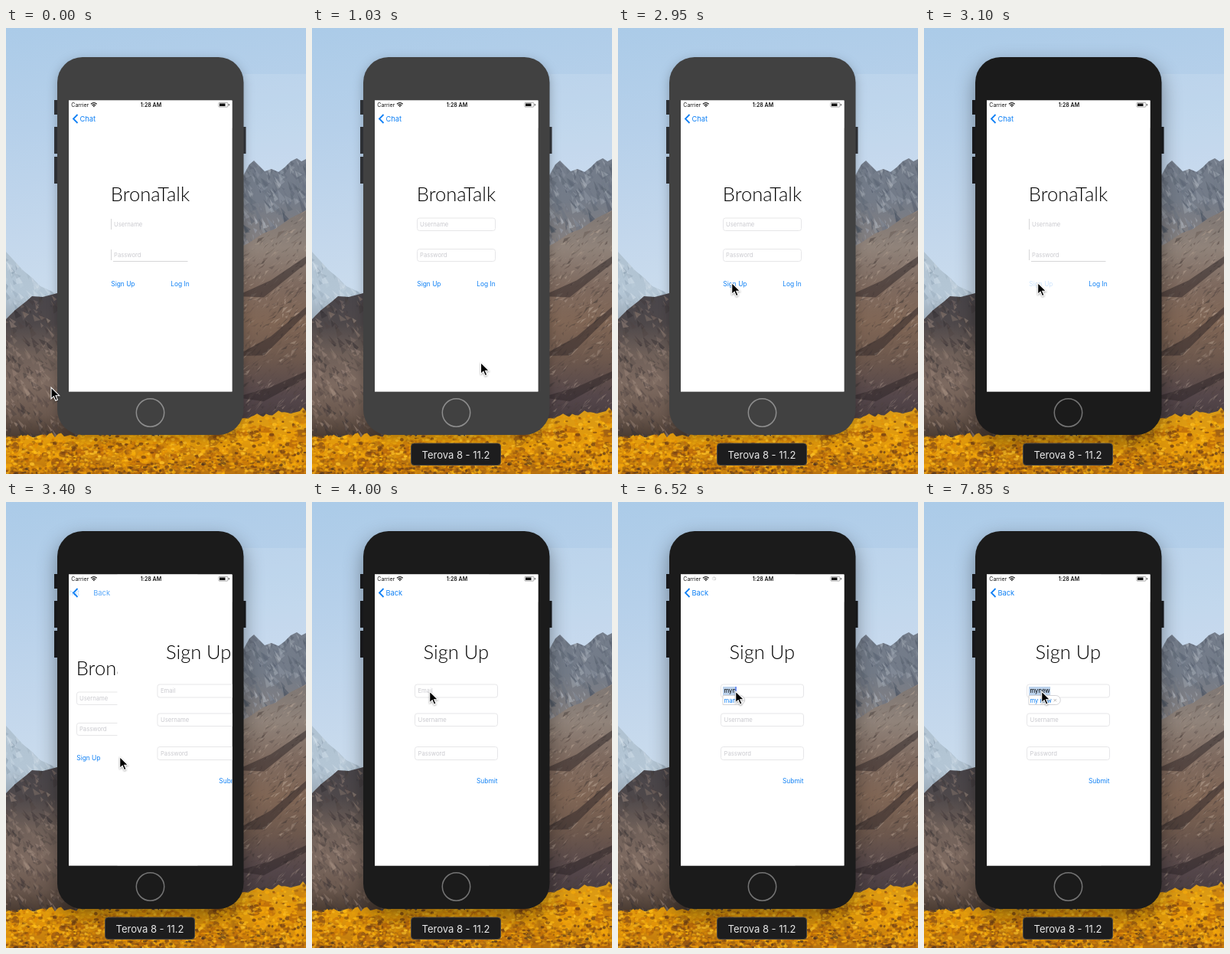
These frames come from a looping animation (392 px wide and 582 px high, 8000 ms). An HTML page with a canvas:

```html
<!DOCTYPE html>
<html lang="en">
<head>
<meta charset="utf-8">
<title>Chat sign up</title>
<style>
  html, body { margin: 0; width: 100%; height: 100%; overflow: hidden; background: #bdd4e9; }
  canvas, svg { position: absolute; left: 0; top: 0; width: 392px; height: 582px; }
  text { font-family: Inter, "Liberation Sans", sans-serif; white-space: pre; }
  #body { fill: #414141; filter: drop-shadow(0 4px 7px rgba(0, 0, 0, .25)); }
  .focused #body { fill: #1b1b1b; filter: drop-shadow(0 10px 13px rgba(0, 0, 0, .4)); }
  .keys { fill: #33363b; }
  .focused .keys { fill: #1d1e21; }
  .home { fill: none; stroke: #8d8d8d; stroke-width: 1.5; }
  .focused .home { stroke: #747474; }
  .status { font-size: 7px; fill: #111; }
  .title { font: 300 25.5px Lato, sans-serif; text-anchor: middle; }
  .nav { font-size: 9.3px; }
  .link { font-size: 8.4px; }
  .nav, .link, #hint { fill: #0f80f5; }
  .end { text-anchor: end; }
  .hold, #typed, #hint { font-size: 7.7px; }
  .hold { fill: #cacacf; }
  .box { fill: #fff; stroke: #e4e4e6; stroke-width: .9; }
  .edge { fill: none; stroke: #d6d6d8; display: none; }
  .faint .box { stroke: none; }
  .faint .edge { display: block; }
</style>
</head>
<body>
<canvas id="scene" width="392" height="582"></canvas>
<svg id="stage" viewBox="0 0 392 582">
  <defs><clipPath id="screen"><rect x="82" y="94.5" width="213.5" height="380"/></clipPath></defs>

  <path class="keys" d="M63 94h5v19h-5zM63 129h5v35h-5zM63 168h5v35h-5zM309 129h4.5v35H309z"/>
  <rect id="body" x="67" y="38" width="243.5" height="493" rx="33"/>
  <circle class="home" cx="188.5" cy="502" r="18.2"/>
  <rect x="82" y="94.5" width="213.5" height="380" fill="#fff"/>

  <g clip-path="url(#screen)">
    <g id="login">
      <rect x="82" y="94.5" width="213.5" height="380" fill="#fff"/>
      <text class="title" x="188.5" y="226">BronaTalk</text>
      <rect class="box" x="137.5" y="248" width="102" height="16.5" rx="3"/>
      <rect class="box" x="137.5" y="288.5" width="102" height="16" rx="3"/>
      <path class="edge" d="M137.5 249v14M137.5 289v14M140 304.5h97.5"/>
      <text class="hold" x="141" y="259">Username</text>
      <text class="hold" x="141" y="298.7">Password</text>
      <text class="link" id="signUp" x="137.3" y="337">Sign Up</text>
      <text class="link end" x="239.7" y="337">Log In</text>
    </g>
    <g id="register">
      <rect x="82" y="94.5" width="213.5" height="380" fill="#fff"/>
      <text class="title" x="188.3" y="205">Sign Up</text>
      <rect class="box" x="134.5" y="238" width="108" height="17" rx="3"/>
      <rect class="box" x="134.5" y="276" width="108" height="16.5" rx="3"/>
      <rect class="box" x="134.5" y="319.5" width="108" height="17" rx="3"/>
      <text class="hold" id="email" x="138.5" y="249.2">Email</text>
      <text class="hold" x="138.5" y="287">Username</text>
      <text class="hold" x="138.5" y="330.7">Password</text>
      <text class="link end" x="242.5" y="367">Submit</text>
      <rect id="mark" x="137" y="241" height="11" fill="#bdd3ec"/>
      <text id="typed" x="138.5" y="249.2"></text>
      <g id="bubble">
        <path id="bubbleBox" fill="#fff" stroke="#cfcfd2" stroke-width=".9"/>
        <text id="hint" x="138.5" y="261.5"></text>
        <path id="cross" d="M-1.7 -1.7l3.4 3.4m0 -3.4l-3.4 3.4" stroke="#aaa" stroke-width=".8"/>
      </g>
      <rect id="caret" y="241" width="1.3" height="11" fill="#426bf2"/>
    </g>
    <rect x="82" y="94.5" width="213.5" height="36" fill="#fff"/>
    <path d="M93.5 113l-5.5 5.5 5.5 5.5" fill="none" stroke="#0f80f5" stroke-width="1.8"/>
    <text class="nav" id="navChat" x="96.5" y="122">Chat</text>
    <text class="nav" id="navBack" x="96.5" y="122">Back</text>
  </g>

  <text class="status" x="85.3" y="102.7">Carrier</text>
  <g fill="none" stroke="#111" stroke-width="1.3">
    <path d="M111 99.3q3.8 -3.2 7.6 0M112.5 101q2.3 -1.9 4.6 0"/>
    <path d="M113.9 102.3h1.8"/>
  </g>
  <g id="spinner" transform="translate(125.5 100)" stroke="#777" stroke-width=".7"></g>
  <text class="status" x="189.5" y="102.7" text-anchor="middle" font-weight="600">1:28 AM</text>
  <rect x="277.9" y="97.4" width="12" height="5.7" rx="1" fill="none" stroke="#888" stroke-width=".7"/>
  <path d="M279 98.4h7.5v3.7H279zM290.8 99.2h.9v2h-.9z" fill="#111"/>

  <g id="label">
    <rect x="129.5" y="542" width="117" height="28.5" rx="4" fill="#1d1d1e" stroke="#4c4640"/>
    <text x="188" y="561.5" text-anchor="middle" font-size="13" fill="#e9e9e9">Terova 8 - 11.2</text>
  </g>
  <path id="pointer" d="M0 0V14.8L3.4 11.7 5.8 17.2 8.3 16.1 6 10.7H10.7Z" stroke="#fff" stroke-width="1.1"
        style="filter: drop-shadow(0 1px 1px rgba(0,0,0,.35))"/>
</svg>
<script>
const $ = id => document.getElementById(id);
const LOOP = 8000, STEP = 4000 / 27;

// Landscape
let seed = 11;
const rand = (a = 0, b = 1) => {
  seed = (seed * 16807) % 2147483647;
  return a + (b - a) * seed / 2147483647;
};
const pick = list => list[Math.floor(rand(0, list.length))];
const ctx = $('scene').getContext('2d');

function gradient(x, top, bottom, colors) {
  const g = ctx.createLinearGradient(0, top, x, bottom);
  colors.forEach((c, i) => g.addColorStop(i / (colors.length - 1), c));
  return g;
}

// A filled ridge with small rock facets that follow its slope.
function ridge(points, base, colors, tints, slope, count) {
  const [left, right] = [points[0][0], points.at(-1)[0]];
  const top = Math.min(...points.map(p => p[1]));
  ctx.save();
  ctx.beginPath();
  ctx.moveTo(left, base);
  points.forEach(p => ctx.lineTo(...p));
  ctx.lineTo(right, base);
  ctx.fillStyle = gradient(0, top, base, colors);
  ctx.fill();
  ctx.clip();
  for (let i = 0; i < count; i++) {
    const x = rand(left - 10, right), y = rand(top, base);
    const len = rand(2, 11), fall = len * slope * rand(.4, 1.6);
    ctx.fillStyle = pick(tints);
    ctx.globalAlpha = rand(.12, .5);
    ctx.beginPath();
    ctx.moveTo(x, y);
    ctx.lineTo(x + len, y + fall);
    ctx.lineTo(x + len * rand(.2, .8), y + fall + rand(1, 6));
    ctx.fill();
  }
  ctx.restore();
}

function blobs(count, edge, size, colors) {
  for (let i = 0; i < count; i++) {
    const x = rand(0, 392), y = rand(edge(x), 582);
    ctx.globalAlpha = rand(.25, .8);
    ctx.fillStyle = pick(colors);
    ctx.beginPath();
    ctx.ellipse(x, y, rand(.4, 1) * size, rand(.3, .7) * size, 0, 0, 7);
    ctx.fill();
  }
  ctx.globalAlpha = 1;
}

function foliage() {
  const edge = x => x < 190 ? 533 - x * .02 : 530 - (x - 190) * .165;
  ctx.beginPath();
  ctx.moveTo(0, 582);
  for (let x = 0; x <= 392; x += 4) ctx.lineTo(x, edge(x) + rand(-4, 4));
  ctx.lineTo(392, 582);
  ctx.fillStyle = gradient(0, 500, 582, ['#d99a16', '#e29a0c', '#b8720f']);
  ctx.fill();
  blobs(170, x => edge(x) + 12, 11, ['#b5650c', '#f0a40c', '#8c4f14', '#e69608']);
  blobs(1500, edge, 3.2, ['#fdbb14', '#f6ab0a', '#ffc52a', '#e28e06', '#c26f0a', '#6f3d14']);
  blobs(420, x => edge(x) + 42, 3, ['#4f3320', '#7d4714', '#9c5a10', '#e29210']);
}

function landscape() {
  ctx.fillStyle = gradient(60, 0, 400, ['#abcbe8', '#b6d0ea', '#c3d7ec', '#cfdfee']);
  ctx.fillRect(0, 0, 392, 582);
  ctx.fillStyle = 'rgba(255,255,255,.1)';
  ctx.fillRect(311, 60, 81, 130);
  ridge([[0, 292], [10, 303], [22, 316], [34, 326], [45, 337], [67, 347], [80, 352]], 400,
    ['#b0c2d1', '#b4c6d5', '#8f9ba7'], ['#dfe9f2', '#8597a8', '#d3e0ea'], 1, 150);
  ridge([[300, 196], [311, 191], [318, 178], [324, 173], [331, 180], [338, 187], [347, 184],
         [356, 188], [364, 182], [372, 174], [380, 170], [386, 174], [392, 171]], 330,
    ['#747d8b', '#737b88', '#837f80', '#887c76'],
    ['#424c5c', '#a0a9b5', '#b4bac2', '#545d6b', '#646e7e'], 1.1, 420);
  ridge([[0, 380], [12, 368], [26, 357], [34, 350], [48, 351], [67, 346], [200, 352]], 545,
    ['#49454a', '#4e484a', '#6f6059', '#7d6a60', '#6a584e', '#3c2f26'],
    ['#302c2f', '#9c8679', '#4e4341', '#ac9689', '#3d3536'], .8, 900);
  ridge([[300, 290], [318, 280], [336, 268], [352, 262], [372, 248], [392, 238]], 530,
    ['#7d7673', '#90837a', '#7e6a5f', '#806655', '#6d584d', '#54464a', '#41373a'],
    ['#35302f', '#ad998b', '#54453f', '#bdaa9a', '#463c3b'], -.8, 900);
  ctx.fillStyle = 'rgba(44,36,38,.5)';
  for (const [x, y, w, h] of [[300, 350, 92, -52], [300, 428, 92, -64], [300, 482, 92, -34]]) {
    ctx.beginPath();
    ctx.moveTo(x, y);
    ctx.lineTo(x + w * .5, y + h * .4);
    ctx.lineTo(x + w, y + h);
    ctx.lineTo(x + w, y + h + 9);
    ctx.lineTo(x + w * .4, y + h * .2 + 12);
    ctx.fill();
  }
  foliage();
}

// Animation
const path = [[0, 59, 469], [7, 220.5, 436.5], [9, 220.5, 436.5], [17, 151, 338],
              [20, 148.7, 332.5], [23, 148.7, 332.5], [27, 153.7, 247]];
const typing = [[0, ''], [37, 'm'], [41, 'my'], [43, 'myn'], [46, 'myne'], [49, 'mynew']];
const hints = [[0, ''], [43, 'man'], [46, 'mine'], [49, 'my new']];

const clamp = v => Math.min(1, Math.max(0, v));
const latest = (list, s) => list.findLast(([at]) => at <= s)[1];
const show = (id, on) => $(id).style.display = on ? '' : 'none';
const shift = (id, x, y = 0) => $(id).setAttribute('transform', `translate(${x} ${y})`);

function pointerAt(s) {
  const i = path.findLastIndex(([at]) => at <= s);
  const a = path[i], b = path[i + 1] || a;
  const u = a === b ? 0 : (s - a[0]) / (b[0] - a[0]);
  const e = u * u * (3 - 2 * u);
  return [a[1] + (b[1] - a[1]) * e, a[2] + (b[2] - a[2]) * e];
}

function drawEmail(s) {
  const text = latest(typing, s), hint = latest(hints, s);
  $('typed').textContent = text;
  $('hint').textContent = hint;
  const end = 138.5 + (text ? $('typed').getComputedTextLength() : 0);
  show('email', !text);
  show('mark', hint);
  $('mark').setAttribute('width', end - 136.5);
  $('caret').setAttribute('x', text ? end - .6 : end);
  show('caret', s >= 29 && ![31, 32, 35].includes(s) && s < 53);
  show('bubble', hint);
  if (hint) {
    const right = 138.5 + $('hint').getComputedTextLength() + 11.5;
    $('bubbleBox').setAttribute('d', `M137 252.5H${right - 6}a6 6 0 0 1 0 12H137Z`);
    shift('cross', right - 7, 258.7);
  }
}

function render(time) {
  const s = Math.floor((time % LOOP + 15) / STEP);
  const push = 1 - (1 - clamp((s - 22) / 3)) ** 3;
  const stage = $('stage').classList;
  stage.toggle('focused', s >= 21);
  stage.toggle('faint', s === 0 || s === 21);
  show('label', s >= 3);
  $('signUp').style.opacity = s === 21 ? .2 : 1;

  shift('login', -64 * push);
  shift('register', 214 * (1 - push));
  show('register', push > 0);
  shift('navChat', -30 * push);
  shift('navBack', 60 * (1 - push));
  $('navChat').style.opacity = 1 - push;
  $('navBack').style.opacity = push;

  show('spinner', s >= 41 && s < 49);
  [...$('spinner').children].forEach((spoke, i) => spoke.style.opacity = .3 + ((i - s + 64) % 8) / 12);
  drawEmail(s);
  shift('pointer', ...pointerAt(s));
}

$('spinner').innerHTML = Array.from({ length: 8 }, (_, i) =>
  `<path d="M0 -1.2V-2.7" transform="rotate(${i * 45})"/>`).join('');
landscape();
const start = performance.now();
(function tick() {
  render(performance.now() - start);
  requestAnimationFrame(tick);
})();
</script>
</body>
</html>
```
